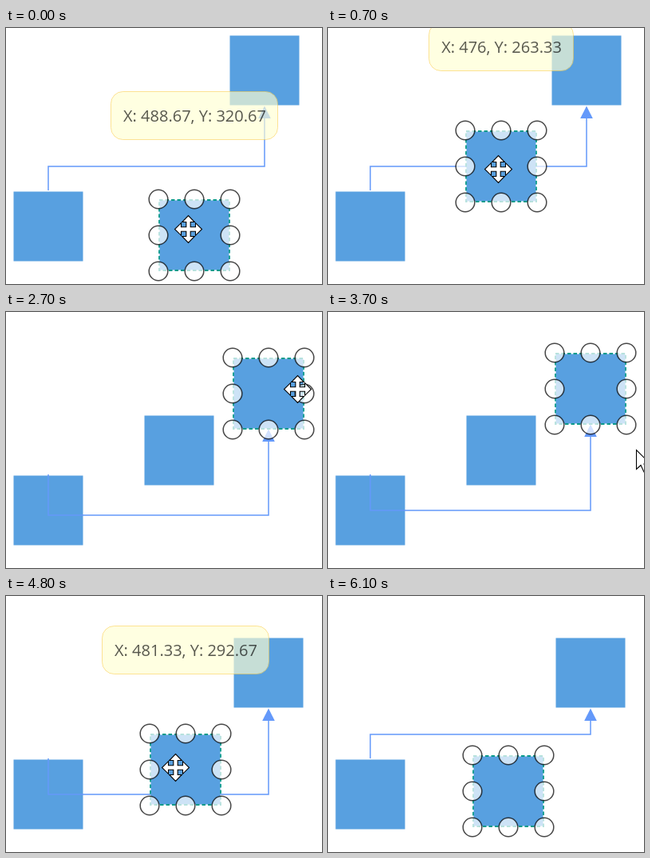
An HTML page with a canvas for the animation above (6.7 s loop, 396 by 320 pixels).

```html
<!DOCTYPE html>
<html lang="en">
<head>
<meta charset="utf-8">
<title>Diagram node dragging</title>
<style>
  html, body { margin: 0; width: 100%; height: 100%; overflow: hidden; background: #fff; }
  canvas { display: block; width: 396px; height: 320px; }
</style>
</head>
<body>
<canvas id="stage" width="396" height="320"></canvas>
<script>
const ctx = document.getElementById('stage').getContext('2d');
const LOOP = 6700, STEP = 100;
const BLUE = '#58a0e0', LINE = '#6499fa';
const HALF = 43.5, GRIP = 45;
const source = { x: 53, y: 248 };

const ramp = (t, from, to) => Math.min(1, Math.max(0, (t - from) / (to - from)));
const within = (t, from, to) => t >= from && t < to;
const point = (x, y) => ({ x: Math.round(x), y: Math.round(y) });
const mix = (a, b, p) => point(a.x + (b.x - a.x) * p, a.y + (b.y - a.y) * p);

// Dragged up, later picked up with a jerk, pulled down and eased to rest.
function middleAt(t) {
  const up = ramp(t, 0, 700), jerk = ramp(t, 4400, 4500);
  const pull = ramp(t, 4500, 5100), rest = ramp(t, 5100, 5400);
  return point(236 - 19 * up + 6 * jerk + 3 * pull,
               259 - 86 * up + 23 * jerk + 42 * pull + 6 * rest);
}

// Dragged down a little too far, then nudged back.
function targetAt(t) {
  const down = Math.sin(ramp(t, 2300, 2800) * Math.PI / 2);
  return point(324 + 5 * down, 53 + 51 * down - 8 * ramp(t, 3100, 3400));
}

function cursorAt(t, middle, target) {
  const grab = point(213, 176), blank = point(262, 75), corner = point(368, 57);
  if (t < 800) return mix(point(228, 251), grab, ramp(t, 0, 700));
  if (t < 1500) return mix(grab, blank, ramp(t, 800, 1300));
  if (t < 2000) return mix(blank, corner, ramp(t, 1500, 1900));
  if (t < 2300) return mix(corner, point(360, 49), ramp(t, 2000, 2200));
  if (t < 3600) return point(target.x + 36, target.y - 6);
  if (t < 4400) {
    const a = Math.PI * (Math.min(t, 4200) - 3700) / 500;
    return point(294 + 92 * Math.cos(a), 172 + 125 * Math.sin(a));
  }
  const held = point(211.5, 195 + (middle.y - 196) * 0.9);
  return mix(held, point(190, 279), ramp(t, 5800, 6000));
}

function routeY(t, target) {
  if (t < 900 || t >= 5700) return 173;
  return target.y < 60 ? 120.5 : target.y + 152;
}

function trace(points, closed) {
  ctx.beginPath();
  points.forEach(([x, y]) => ctx.lineTo(x, y));
  if (closed) ctx.closePath();
}

function drawNode({ x, y }) {
  ctx.fillStyle = BLUE;
  ctx.fillRect(x - HALF, y - HALF, HALF * 2, HALF * 2);
}

function drawConnector(y, target) {
  const tip = target.y + 44.5;
  ctx.strokeStyle = ctx.fillStyle = LINE;
  ctx.lineWidth = 1.5;
  trace([[source.x, 203], [source.x, y], [target.x, y], [target.x, tip + 13]]);
  ctx.stroke();
  trace([[target.x, tip], [target.x + 7.8, tip + 15.5], [target.x - 7.8, tip + 15.5]], true);
  ctx.fill();
}

function drawSelection({ x, y }) {
  ctx.strokeStyle = '#0a9a8c';
  ctx.lineWidth = 1.8;
  ctx.setLineDash([4.5, 3]);
  ctx.strokeRect(x - 44, y - 44, 88, 88);
  ctx.setLineDash([]);
  ctx.fillStyle = 'rgba(255,255,255,.7)';
  ctx.strokeStyle = 'rgba(0,0,0,.72)';
  ctx.lineWidth = 1.5;
  for (let i = -1; i <= 1; i++) {
    for (let j = -1; j <= 1; j++) {
      if (!i && !j) continue;
      ctx.beginPath();
      ctx.arc(x + i * GRIP, y + j * GRIP, 11.8, 0, Math.PI * 2);
      ctx.fill();
      ctx.stroke();
    }
  }
}

const label = v => v.toFixed(2).replace('.00', '');

function drawTooltip({ x, y }) {
  const text = `X: ${label(476 + (x - 217) / 1.5)}, Y: ${label(263 + 1 / 3 + (y - 173) / 1.5)}`;
  ctx.save();
  ctx.globalAlpha = 0.66;
  ctx.font = '20px "Open Sans", "Noto Sans", sans-serif';
  ctx.textAlign = 'center';
  const w = Math.round(ctx.measureText(text).width / 2) * 2 + 31;
  const box = inset => {
    ctx.beginPath();
    ctx.roundRect(x - w / 2 + inset, y - 179.5 + inset, w - 2 * inset, 60 - 2 * inset, 15 - inset);
  };
  box(0.5);
  ctx.fillStyle = '#ffffd2';
  ctx.fill();
  box(0);
  ctx.strokeStyle = '#fbd45c';
  ctx.lineWidth = 1;
  ctx.stroke();
  ctx.fillStyle = '#000';
  ctx.fillText(text, x + 0.5, y - 142);
  ctx.restore();
}

// One arm of the move cursor, turned four times.
const arm = [[-2.7, -2.7], [-2.7, -9], [-7.8, -9], [0, -17], [7.8, -9], [2.7, -9]];
const moveShape = [0, 1, 2, 3].flatMap(q => arm.map(([x, y]) =>
  [[x, y], [-y, x], [-x, -y], [y, -x]][q]));
const arrowShape = [[0, 0], [0, 24], [5.5, 19], [9.5, 27.5], [13, 26], [9.5, 17.5], [17, 17]];

function drawCursor({ x, y }, overNode) {
  ctx.save();
  ctx.translate(x + 0.5, y + 0.5);
  trace(overNode ? moveShape : arrowShape, true);
  ctx.fillStyle = '#fff';
  ctx.fill();
  ctx.strokeStyle = '#000';
  ctx.lineWidth = 1.1;
  ctx.stroke();
  ctx.restore();
}

function render(now) {
  const t = Math.floor((now % LOOP) / STEP) * STEP;
  const middle = middleAt(t), target = targetAt(t);
  const cursor = cursorAt(t, middle, target);
  const over = n => Math.abs(cursor.x - n.x) < 49 && Math.abs(cursor.y - n.y) < 49;

  ctx.fillStyle = '#fff';
  ctx.fillRect(0, 0, 396, 320);
  drawNode(source);
  drawConnector(routeY(t, target), target);
  drawNode(middle);
  drawNode(target);
  if (t < 1600 || t >= 4400) drawSelection(middle);
  if (within(t, 2400, 4400)) drawSelection(target);
  if (t < 900 || within(t, 4500, 5700)) drawTooltip(middle);
  if (t < 6100) drawCursor(cursor, over(middle) || over(target));
}

const start = performance.now();
function loop() {
  render(performance.now() - start);
  requestAnimationFrame(loop);
}
loop();
</script>
</body>
</html>
```
